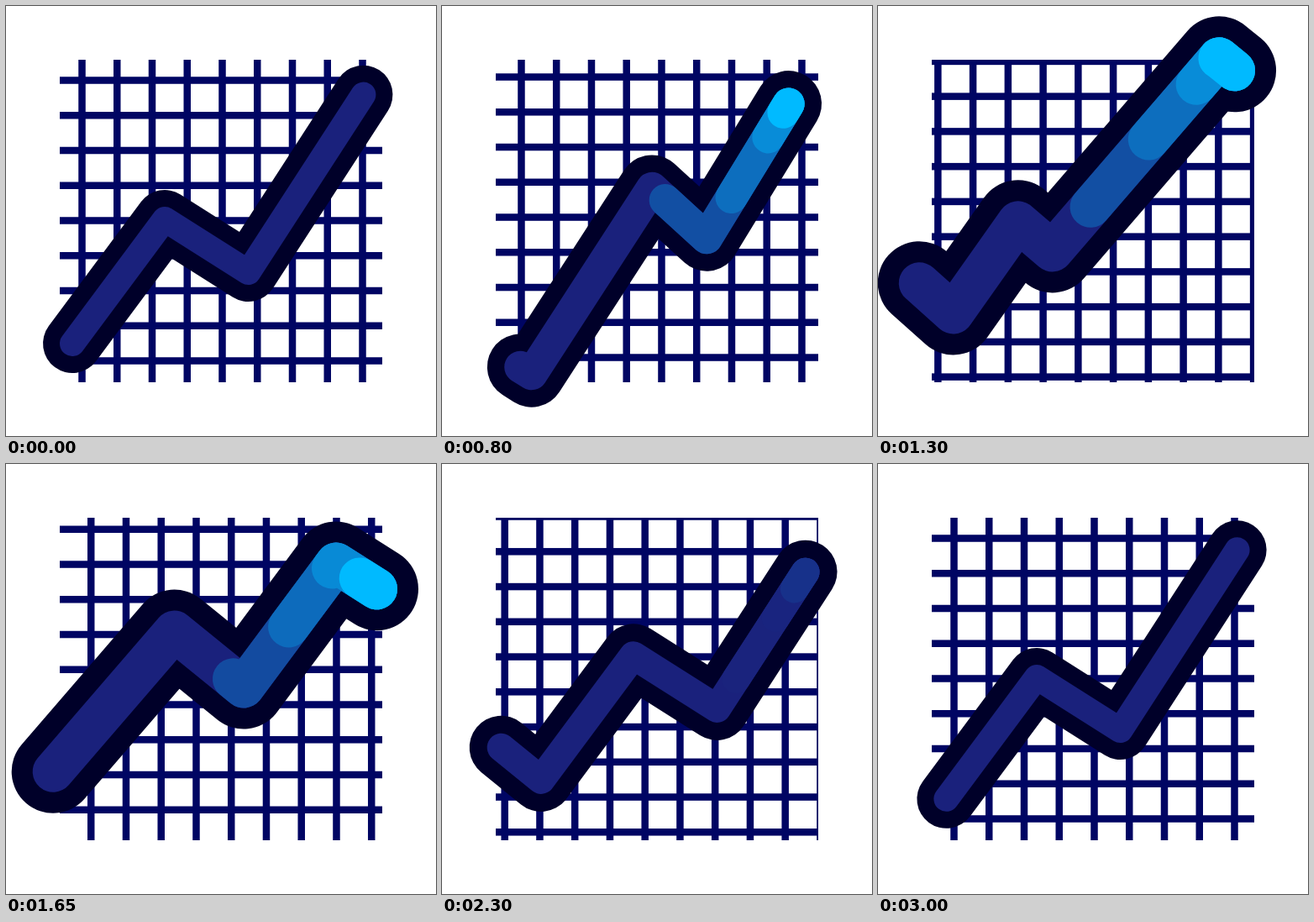
An HTML page with a canvas for the animation above (3050 ms loop, 512 by 512 pixels).

```html
<!DOCTYPE html>
<html lang="en">
<head>
<meta charset="utf-8">
<title>Rising chart</title>
<style>
html, body { margin: 0; width: 100%; height: 100%; overflow: hidden; background: #fff; }
canvas { display: block; width: 512px; height: 512px; }
</style>
</head>
<body>
<canvas id="stage" width="512" height="512"></canvas>
<script>
const ctx = document.getElementById('stage').getContext('2d');

const LOOP = 3050, STEP = 50, TRAVEL = 2980;
const CELL = 41.75, SCROLL = 16 * CELL;

// One period of the zigzag; it repeats shifted by (1.5 * SCROLL, -SCROLL).
const zigzag = [
  [79, 402], [189, 254], [288.5, 317], [432, 95.5], [497, 155],
  [635, -71], [682, -29], [759, -138], [800, -103], [998.5, -333]
];
const path = [...zigzag, ...zigzag.slice(0, 5).map(([x, y]) => [x + 1.5 * SCROLL, y - SCROLL])];

let period = 0;
for (let i = 0; i < zigzag.length; i++) {
  period += Math.hypot(path[i + 1][0] - path[i][0], path[i + 1][1] - path[i][1]);
}

// Trail bands, brightest last: reach behind the tip, colour mix, growth delay, fade start.
const bands = [
  { reach: 258, mix: 0.3, delay: -0.03, fade: 1.5 },
  { reach: 152, mix: 0.5, delay: 0.12, fade: 1.57 },
  { reach: 65, mix: 0.7, delay: 0.22, fade: 1.58 },
  { reach: 24, mix: 1, delay: 0.35, fade: 1.66 }
];

const clamp = v => Math.min(1, Math.max(0, v));
const smooth = (a, b, t) => {
  const v = clamp((t - a) / (b - a));
  return v * v * (3 - 2 * v);
};
const sine = v => (1 - Math.cos(Math.PI * clamp(v))) / 2;

// Same as cubic-bezier(.481, 0, .25, 1)
function ease(x) {
  let lo = 0, hi = 1;
  for (let i = 0; i < 30; i++) {
    const u = (lo + hi) / 2, v = 1 - u;
    if (3 * 0.481 * u * v * v + 3 * 0.25 * u * u * v + u * u * u < x) lo = u;
    else hi = u;
  }
  return lo * lo * (3 - 2 * lo);
}

function blend(k) {
  const base = [26, 33, 124], bright = [0, 186, 255];
  return `rgb(${base.map((c, i) => Math.round(c + (bright[i] - c) * k))})`;
}

function drawGrid(shift) {
  ctx.save();
  ctx.beginPath();
  ctx.rect(64, 64, 384, 384);
  ctx.clip();
  ctx.fillStyle = '#000563';
  const offset = shift % CELL;
  for (let i = -2; i < 11; i++) {
    ctx.fillRect(90.5 - offset + i * CELL - 4.25, 64, 8.5, 384);
    ctx.fillRect(64, 88.5 + offset + i * CELL - 4.25, 384, 8.5);
  }
  ctx.restore();
}

function strokePart(from, to, radius, color) {
  ctx.setLineDash([Math.max(0.1, to - from), 1e5]);
  ctx.lineDashOffset = -from;
  ctx.lineWidth = 2 * radius;
  ctx.strokeStyle = color;
  ctx.beginPath();
  path.forEach(([x, y]) => ctx.lineTo(x, y));
  ctx.stroke();
}

function draw(ms) {
  const t = ms / 1000, p = Math.min(1, ms / TRAVEL), e = ease(p);
  const shift = SCROLL * e;
  const swell = smooth(0.3, 1.45, t) - smooth(1.5, 2.6, t);
  const bulge = smooth(0.7, 1.3, t) - smooth(1.8, 2.5, t);
  const radius = 15 + 10 * swell;
  const border = 20 + 5 * bulge;
  const start = period * e + 4 * p ** 4 - 6 * bulge;
  const tip = start + 554 + 15 * bulge;

  ctx.fillStyle = '#fff';
  ctx.fillRect(0, 0, 512, 512);
  drawGrid(shift);

  ctx.save();
  ctx.translate(-1.5 * shift, shift);
  ctx.lineCap = ctx.lineJoin = 'round';
  strokePart(start, tip, radius + border, '#000029');
  strokePart(start, tip, radius, blend(0));
  for (const b of bands) {
    const glow = smooth(0, 0.35, t) * (1 - smooth(b.fade, b.fade + 0.8, t));
    if (glow > 0) {
      const reach = b.reach * sine((t - b.delay) / 0.9);
      strokePart(tip - reach, tip, radius, blend(b.mix * glow));
    }
  }
  ctx.restore();
}

const begin = performance.now();
function tick() {
  const elapsed = performance.now() - begin + 6;
  draw(Math.floor((elapsed % LOOP) / STEP) * STEP);
  requestAnimationFrame(tick);
}
tick();
</script>
</body>
</html>
```
